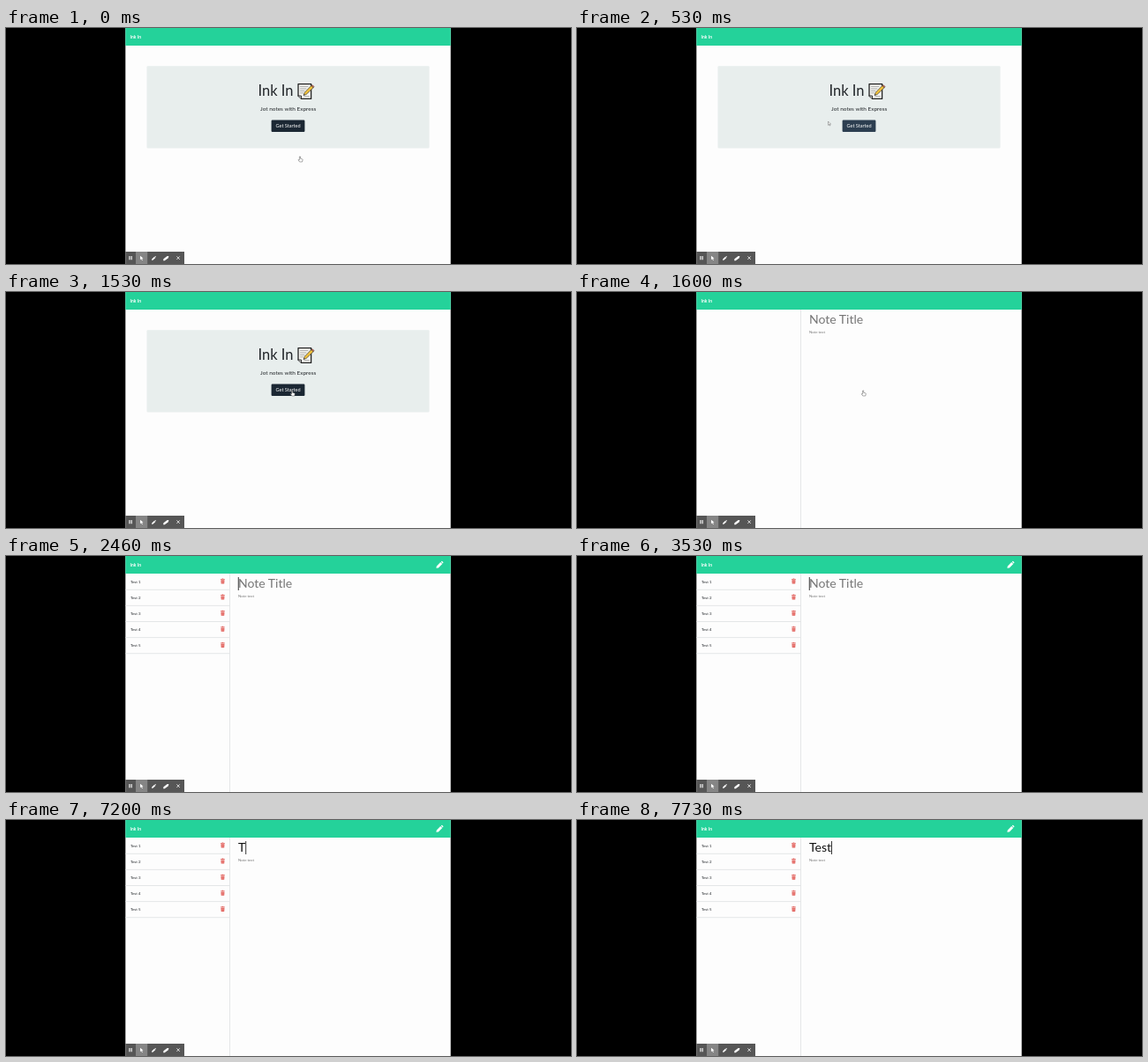
An HTML page that plays this animation: 640x268 px, repeating every 8000 ms.

```html
<!DOCTYPE html>
<html lang="en">
<head>
<meta charset="utf-8">
<title>Notes demo</title>
<style>
  html, body { margin: 0; width: 100%; height: 100%; overflow: hidden; background: #000; }
  svg { display: block; width: 640px; height: 268px; font-family: Lato, sans-serif; }
  .hidden { visibility: hidden; }
</style>
</head>
<body>
<svg viewBox="0 0 640 268">
  <defs>
    <g id="pen">
      <path d="M0 8 .5 5.6 4.9 1.2 6.9 3.2 2.5 7.6Z M5.5 .7 6 .2Q6.4-.1 6.8.2L7.9 1.3Q8.2 1.7 7.9 2.1L7.4 2.6Z"/>
    </g>
    <g id="bin" fill="#e2625d">
      <path d="M0 .6H1.5L1.8 0H3.1L3.4 .6H4.9V1.3H0Z M.4 1.8H4.5L4.2 6H.7Z"/>
      <path d="M1.6 2.6V5.2M2.45 2.6V5.2M3.3 2.6V5.2" stroke="#f3b5b2" stroke-width=".3"/>
    </g>
  </defs>

  <rect x="135.3" width="368.4" height="268" fill="#fdfdfd"/>
  <rect x="135.3" width="368.4" height="20" fill="#24d29a"/>
  <text x="140.6" y="11.8" font-size="5" font-weight="700" fill="#fff">Ink In</text>

  <g id="home">
    <rect x="159.5" y="43.2" width="320" height="93.2" rx="1" fill="#e8eeed"/>
    <text x="325.3" y="77.2" font-size="16.4" text-anchor="end" fill="#212529">Ink In</text>
    <g stroke-linejoin="round" stroke-linecap="round">
      <path d="M331 63.6H345.6V80.4H334.5L331 77Z" fill="#f6f6f2" stroke="#222" stroke-width="1.3"/>
      <path d="M331 77H334.5V80.4" fill="#ccc" stroke="#222" stroke-width=".9"/>
      <path d="M333.3 66.6H342M333.3 69H340M333.3 71.4H338M333.3 73.8H336.5M338 77.6H343.4" stroke="#8a8a8a" stroke-width=".7"/>
      <path d="M337.2 76.2 338.3 73.2 346 65.3 348.3 67.5 340.3 75.2Z" fill="#f5c33b" stroke="#333" stroke-width=".7"/>
      <path d="M346 65.3 347 64.6 349 66.6 348.3 67.5Z" fill="#d9644e" stroke="#333" stroke-width=".5"/>
      <path d="M337.2 76.2 337.7 74.9 338.5 75.7Z" fill="#222"/>
    </g>
    <text x="319.7" y="94" font-size="6.45" text-anchor="middle" fill="#212529">Jot notes with Express</text>
    <rect id="button" x="300.6" y="104.6" width="37.8" height="13.4" rx="1.1" fill="#2c3e50"/>
    <text x="319.5" y="113.4" font-size="5.57" text-anchor="middle" fill="#fff">Get Started</text>
  </g>

  <g id="editor">
    <path d="M253.5 20V268" stroke="#dfe1e2" stroke-width=".8"/>
    <text id="title" x="263" y="36" font-size="14"></text>
    <text x="263" y="47.4" font-size="4.3" fill="#777">Note text</text>
    <rect id="caret" y="24" width=".9" height="15" fill="#222"/>
    <g id="list"></g>
  </g>

  <g id="tools">
    <rect x="135.3" y="254" width="66.7" height="14" fill="#565656"/>
    <rect x="147" y="254" width="13.2" height="14" fill="#858585"/>
    <g fill="#fff">
      <path d="M139.4 259H140.5V263.2H139.4ZM141.6 259H142.7V263.2H141.6Z"/>
      <path d="M152 258.8 155.4 261.6 154 261.9 154.9 263.7 154.1 264.1 153.2 262.2 152.1 263.1Z"/>
      <use href="#pen" transform="translate(165 258.9) scale(.62)"/>
      <path d="M178.4 262.2 182.6 259H184.4L183.8 261.2 179.6 264.2H178.2Z"/>
      <path d="M193.4 259.3 196.8 262.9M196.8 259.3 193.4 262.9" stroke="#fff" stroke-width=".75"/>
    </g>
  </g>

  <path id="arrow" d="M0 0V4.3L1 3.4 1.7 5 2.4 4.7 1.7 3.2H3Z" fill="#fff" stroke="#666" stroke-width=".5"/>
  <path id="hand" d="M-.6 0Q0-.7 .5 0V2.3L2.7 2.9Q3.2 3.1 3 4L2.5 6H-.4L-2 3.8Q-1.9 3-.6 3.8Z" fill="#fff" stroke="#555" stroke-width=".5"/>
</svg>
<script>
  const LOOP = 8000;
  const $ = id => document.getElementById(id);
  const show = (id, on) => $(id).classList.toggle("hidden", !on);

  const rows = [1, 2, 3, 4, 5].map(n => {
    const y = 20 + (n - 1) * 18.1;
    return `<text x="141" y="${y + 10.9}" font-size="4.4" fill="#212529">Test ${n}</text>
      <use href="#bin" x="243" y="${y + 5.5}"/>
      <path d="M135.3 ${y + 18.3}H253.5" stroke="#dfe1e2" stroke-width=".8"/>`;
  });
  $("list").innerHTML = rows.join("") + '<use href="#pen" x="487.3" y="5.8" fill="#fff"/>';

  // Pointer stops: time, x, y
  const path = [[0, 333, 146], [530, 284.5, 106], [660, 284.5, 106], [1270, 324.2, 112]];
  const blinks = [2400, 2930, 3530, 4060, 4600, 5130, 5600, 6130, 6660];
  const typing = [7200, 7530, 7660, 7730];

  const passed = (times, t) => times.filter(at => t >= at).length;

  function pointer(t) {
    const i = path.findIndex(p => p[0] > t);
    if (i < 0) return path[path.length - 1].slice(1);
    const [a, b] = [path[i - 1], path[i]];
    const k = (t - a[0]) / (b[0] - a[0]);
    const e = k * k * (3 - 2 * k);
    return [a[1] + (b[1] - a[1]) * e, a[2] + (b[2] - a[2]) * e];
  }

  function draw(t) {
    const step = Math.floor((t + 6.7) * 0.015);
    const [x, y] = pointer(Math.floor(step * 20 / 3) * 10);
    const home = t < 1600;
    const over = home && x > 300.6;

    show("home", home);
    show("editor", !home);
    show("list", t >= 1660);
    show("arrow", home && !over);
    show("hand", over || (!home && t < 1800));
    $("button").setAttribute("fill", over ? "#1b2733" : "#2c3e50");
    for (const id of ["arrow", "hand"]) $(id).setAttribute("transform", `translate(${x} ${y})`);

    const typed = "Test".slice(0, passed(typing, t));
    const title = $("title");
    title.textContent = typed || "Note Title";
    title.setAttribute("fill", typed ? "#111" : "#757575");
    $("caret").setAttribute("x", typed ? 263 + title.getComputedTextLength() : 262.8);
    show("caret", typed || passed(blinks, t) % 2 === 1);
  }

  const start = performance.now();
  function tick() {
    draw((performance.now() - start) % LOOP);
    requestAnimationFrame(tick);
  }
  tick();
</script>
</body>
</html>
```
